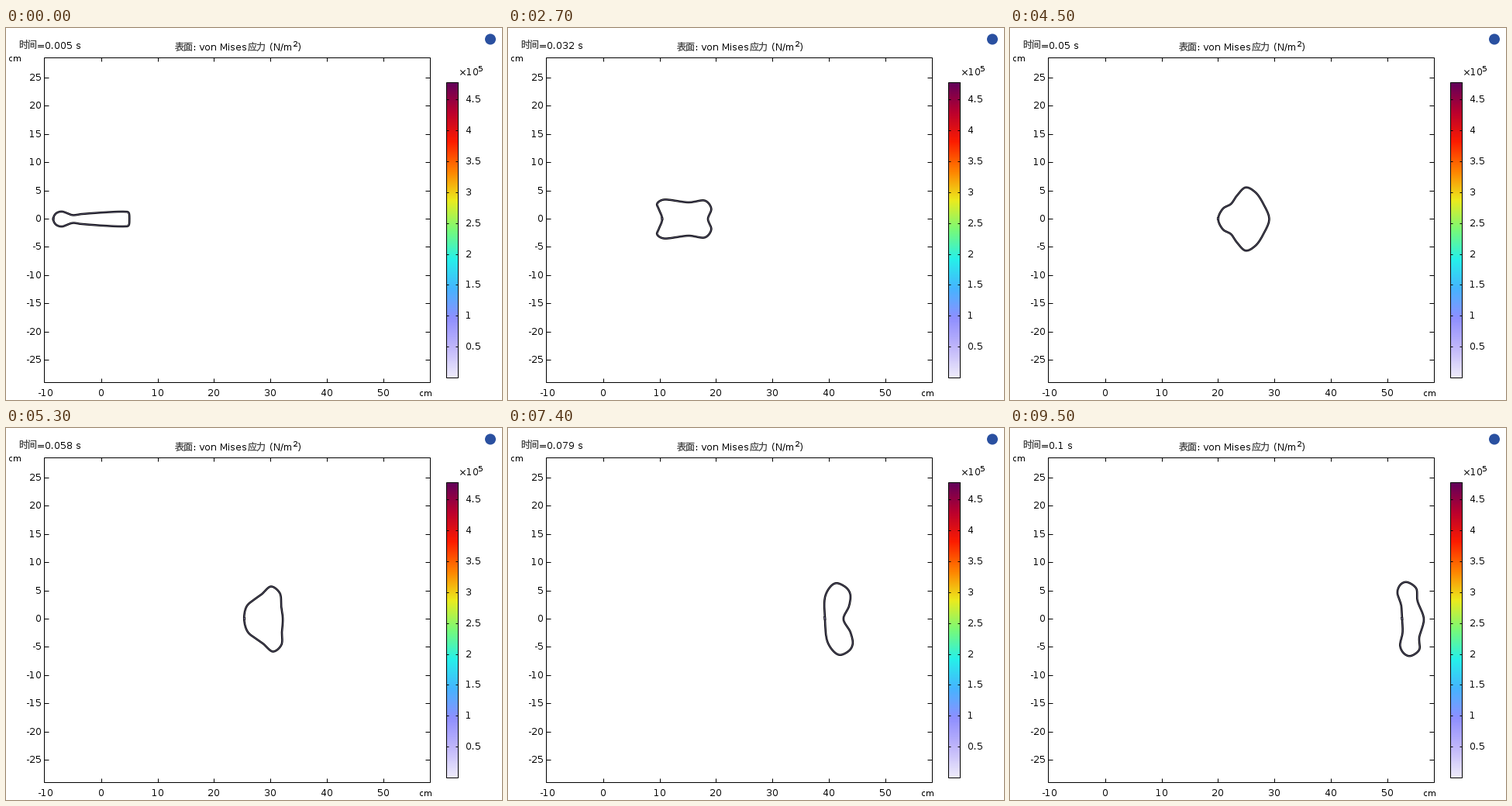
These frames come from a looping animation (640x480 px, 9600 ms). A matplotlib script:

```python
import numpy as np
import matplotlib.pyplot as plt
from matplotlib.animation import FuncAnimation
from matplotlib.colors import LinearSegmentedColormap
from matplotlib.patches import Circle, Rectangle

plt.rcParams["font.family"] = ["DejaVu Sans", "Noto Sans CJK JP"]
plt.rcParams["text.hinting"] = "native"
plt.rcParams["text.hinting_factor"] = 1

W, H = 640, 480
FRAMES, INTERVAL = 96, 100
PX = 0.72  # points per pixel at 100 dpi
MID = 246  # pixel row of the symmetry axis

fig = plt.figure(figsize=(6.4, 4.8), dpi=100, facecolor="white")
ax = fig.add_axes([0, 0, 1, 1])
ax.axis("off")


def label(x, y, text, size=12, ha="left", **style):
    return ax.text(x, y, text, fontsize=size * PX, ha=ha, va="baseline", **style)


def cjk(x, y, text):
    label(x, y, text, color="#444444", weight="light")


def line(x0, y0, x1, y1):
    ax.plot([x0, x1], [y0, y1], color="black", lw=PX, solid_capstyle="butt", snap=False)


def box(x0, y0, x1, y1):
    ax.add_patch(Rectangle((x0, y0), x1 - x0, y1 - y0, fill=False, ec="black",
                           lw=PX, snap=False, zorder=3))


def draw_axes():
    left, top, right, bottom = 49.5, 38.5, 547.5, 457.5
    box(left, top, right, bottom)
    for v in range(-10, 51, 10):
        x = round(122.7 + 7.285 * v)
        label(max(x, left + 2), 475, str(v), ha="center")
        if v > -10:
            line(x + 0.5, top, x + 0.5, top + 5)
            line(x + 0.5, bottom, x + 0.5, bottom - 5)
    for v in range(-25, 26, 5):
        y = round(MID - 7.28 * v)
        label(46, y + 4, str(v), ha="right")
        line(left, y + 0.5, left + 6, y + 0.5)
        line(right, y + 0.5, right - 6, y + 0.5)
    label(3, 43, "cm", 11)
    label(533, 475, "cm", 11)


def draw_colorbar():
    left, top, right, bottom = 568.5, 70.5, 583.5, 451.5
    colors = ["#eeebfa", "#c0b6fa", "#8f8fff", "#46b4ff", "#26f0ea", "#78fa78",
              "#ebeb1e", "#ff8200", "#fc1c00", "#ba002e", "#62005a"]
    cmap = LinearSegmentedColormap.from_list("stress", colors, N=512)
    ramp = np.linspace(1, 0, 381)[:, None]
    ax.imshow(ramp, cmap=cmap, extent=(left, right, bottom, top), aspect="auto",
              interpolation="nearest")
    box(left, top, right, bottom)
    for k in range(1, 10):
        y = round(451.2 - 39.92 * k)
        label(593, y + 4, f"{k / 2:g}")
        line(left, y + 0.5, left + 3, y + 0.5)
        line(right, y + 0.5, right - 3, y + 0.5)
    label(584, 61, "×10")
    label(609, 56, "5", 10)


def draw_title():
    cjk(218, 29, "表面")
    label(242, 29, ": von Mises")
    cjk(312, 29, "应力")
    label(340, 29, "(N/m")
    label(370, 24, "2", 10)
    label(376, 29, ")")
    cjk(16, 27, "时间")


def ring(half, lean=0.0):
    """Mirror an upper half (left tip to right tip, heights up), then shear it."""
    half = np.array(half) * (1, -1)
    points = np.vstack([half, half[-2:0:-1] * (1, -1)])
    points[:, 0] += lean * points[:, 1]
    return points


# Key shapes of the vibrating ring, relative to its centre, by frame number.
SHAPES = {
    0: ring([(-49, 0), (-46, 6.8), (-38.5, 9.7), (-24, 5.1),
             (-13, 6.4), (43, 9.5), (48, 8.5), (49.3, 0)]),
    16: ring([(-36.3, 0), (-28.5, 11), (-17.3, 23.3), (-10, 19.5),
              (-1, 7.3), (20.5, 21.9), (33, 13.5), (37.7, 0)]),
    27: ring([(-26.3, 0), (-30.8, 13), (-33, 19.5), (-26, 24.7),
              (8, 21.5), (29.5, 23.5), (37, 13.5), (32.7, 0)]),
    45: ring([(-33.5, 0), (-27.3, 13.5), (-17, 19.5), (-9.5, 30),
              (2, 40.8), (14.5, 34.5), (25.3, 18.5), (32.3, 0)]),
    61: ring([(-23, 0), (-22, 21), (-11.7, 33.7), (-2.5, 35.2),
              (12.5, 41), (22, 31.5), (14.8, 13.5), (9.5, 0)], lean=0.06),
    74: ring([(-17, 0), (-15, 30), (-5.5, 44), (1, 46.3),
              (13, 40), (17.2, 32), (15, 17), (6.9, 0)], lean=0.05),
    95: ring([(-9.7, 0), (-10, 17.5), (-14, 35), (-9.2, 44.8),
              (-1.7, 47.7), (10.3, 39.8), (11.2, 24), (18.3, 0)], lean=0.05),
}
KEYS = np.array(list(SHAPES), float)
POSES = np.stack(list(SHAPES.values()))
RATES = np.gradient(POSES, KEYS, axis=0)


def hermite(p0, m0, p1, m1, u):
    return ((2 * u**3 - 3 * u**2 + 1) * p0 + (u**3 - 2 * u**2 + u) * m0
            + (3 * u**2 - 2 * u**3) * p1 + (u**3 - u**2) * m1)


def pose_at(n):
    """Steady drift to the right plus the eased change of shape."""
    i = min(np.searchsorted(KEYS, n, side="right") - 1, len(KEYS) - 2)
    span = KEYS[i + 1] - KEYS[i]
    shape = hermite(POSES[i], RATES[i] * span, POSES[i + 1], RATES[i + 1] * span,
                    (n - KEYS[i]) / span)
    return shape + (110 + 4.27 * n, MID + 0.5)


def closed_curve(points, steps=14):
    """Closed centripetal Catmull-Rom curve through the points."""
    ahead = np.roll(points, -1, axis=0) - points
    gap = np.sqrt(np.hypot(*ahead.T))[:, None]
    back, gap_back = np.roll(ahead, 1, axis=0), np.roll(gap, 1, axis=0)
    slope = (back / gap_back * gap + ahead / gap * gap_back) / (gap + gap_back)
    u = np.linspace(0, 1, steps, endpoint=False)[None, :, None]
    curve = hermite(points[:, None], (slope * gap)[:, None], (points + ahead)[:, None],
                    (np.roll(slope, -1, axis=0) * gap)[:, None], u).reshape(-1, 2)
    return np.vstack([curve, curve[:2]])


draw_axes()
draw_colorbar()
draw_title()
ax.add_patch(Circle((625, 14.5), 7, color="#2a50a0", lw=0))

clock = label(40, 27, "")
wall, = ax.plot([], [], color="black", lw=2.6 * PX, solid_joinstyle="round")
core, = ax.plot([], [], color="#a8a0d8", lw=0.5 * PX, solid_joinstyle="round")

ax.set_xlim(0, W)
ax.set_ylim(H, 0)


def update(n):
    x, y = closed_curve(pose_at(n)).T
    wall.set_data(x, y)
    core.set_data(x, y)
    clock.set_text(f"={(n + 5) / 1000:g} s")
    return wall, core, clock


anim = FuncAnimation(fig, update, frames=FRAMES, interval=INTERVAL, repeat=True,
                     repeat_delay=0, blit=False)
plt.show()
```
